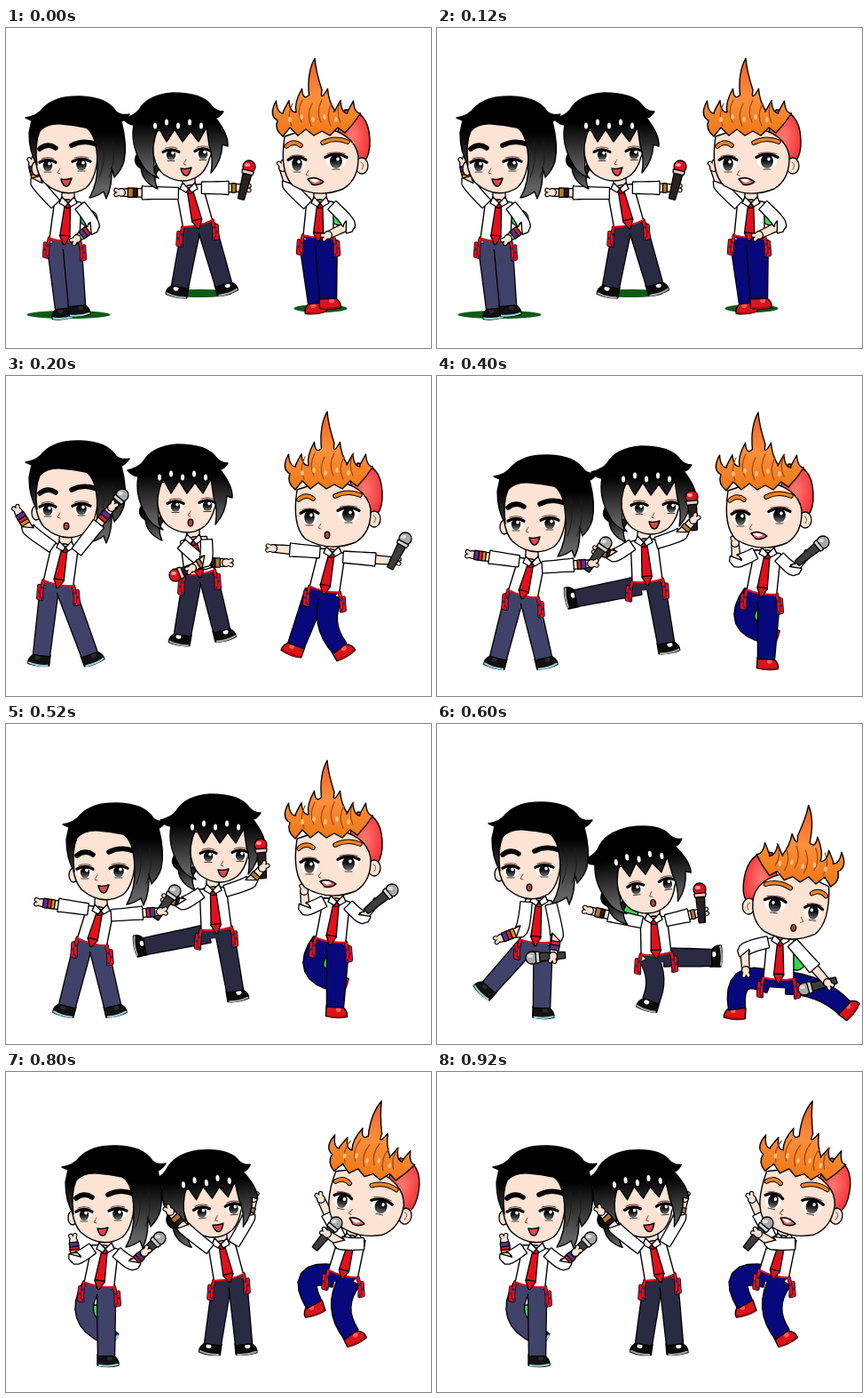
An HTML page that plays this animation: 479 by 360 pixels, repeating every 1000 ms.

```html
<!DOCTYPE html>
<html lang="en">
<head>
<meta charset="utf-8">
<title>Dancing trio</title>
<style>
html, body { margin: 0; width: 100%; height: 100%; overflow: hidden; background: #fff; }
svg { display: block; width: 100vw; height: 100vh; }
</style>
</head>
<body>
<svg viewBox="0 0 479 360" preserveAspectRatio="none">
  <defs>
    <linearGradient id="dark" x1="0" y1="0" x2="0" y2="1">
      <stop offset=".35" stop-color="#000"/><stop offset=".9" stop-color="#626262"/>
    </linearGradient>
    <linearGradient id="fire" x1="0" y1="0" x2="0" y2="1">
      <stop offset="0" stop-color="#ef5f26"/><stop offset=".5" stop-color="#fb8f3c"/><stop offset="1" stop-color="#ee7714"/>
    </linearGradient>
    <radialGradient id="shave" cx=".45" cy=".5" r=".6">
      <stop offset="0" stop-color="#ff7a70"/><stop offset="1" stop-color="#f42f35"/>
    </radialGradient>
    <linearGradient id="iris" x1="0" y1="0" x2="0" y2="1">
      <stop offset=".45" stop-color="#0c0c0c"/><stop offset="1" stop-color="#777"/>
    </linearGradient>
  </defs>
  <g id="stage" stroke-linejoin="round" stroke-linecap="round"></g>
</svg>
<script>
const SKIN = '#fde3d3', RED = '#e50f1c', INK = '#000';

const path = (d, fill = 'none', stroke = INK, width = 1.4) =>
  `<path d="${d}" fill="${fill}" stroke="${stroke}" stroke-width="${width}"/>`;
const oval = (x, y, rx, ry, fill, stroke = 'none') =>
  `<ellipse cx="${x}" cy="${y}" rx="${rx}" ry="${ry}" fill="${fill}" stroke="${stroke}" stroke-width="1.3"/>`;
const mix = (a, b, k) => a.map((v, i) => v + (b[i] - v) * k);
const add = (a, b, k = 1) => a.map((v, i) => v + b[i] * k);
const loop = (n, f) => Array.from({ length: n }, (_, i) => f(i)).join('');

// Unit vector from a to b, and the same vector turned a quarter to the right
const unit = (a, b) => {
  const d = Math.hypot(b[0] - a[0], b[1] - a[1]) || 1;
  return [(b[0] - a[0]) / d, (b[1] - a[1]) / d];
};
const turned = ([x, y]) => [-y, x];

// Tapered tube that bends softly near the joint
function limb(a, joint, b, from, to, fill) {
  const bend = mix(mix(a, b, .5), joint, 1.5), left = [], right = [];
  for (let k = 0; k <= 1; k += .125) {
    const p = mix(a, bend, k), q = mix(bend, b, k), at = mix(p, q, k);
    const n = turned(unit(p, q)), r = (from + (to - from) * k) / 2;
    left.push(add(at, n, r));
    right.unshift(add(at, n, -r));
  }
  return `<path d="M${left.concat(right).join(' ')}Z" fill="${fill}" stroke="#000" stroke-width="2.6" paint-order="stroke"/>`;
}
const tube = (a, b, from, to, fill) => limb(a, mix(a, b, .5), b, from, to, fill);

// Joint pushed sideways off the straight line from a to b
const joint = (a, [x, y, bend = 0], side) => add(mix(a, [x, y], .5), turned(unit(a, [x, y])), -side * bend);

function arm(from, goal, side, bands) {
  const elbow = joint(from, goal, side), hand = goal.slice(0, 2), u = unit(elbow, hand), n = turned(u);
  const fingers = [-2.5, 2.5].map(k => `M${hand}L${add(add(hand, u, 6), n, k)}`).join('');
  return tube(elbow, hand, 9, 7, SKIN) + path(fingers, 'none', INK, 5.4) +
    oval(...hand, 4.4, 4.4, SKIN, INK) + path(fingers, 'none', SKIN, 3.2) +
    bands.map((c, i) => tube(mix(elbow, hand, .45 + i * .15), mix(elbow, hand, .6 + i * .15), 9, 9, c)).join('') +
    limb(from, mix(elbow, mix(from, hand, .5), .15), mix(elbow, hand, .25), 12, 14, '#fff');
}

function mic(tip, hand, red) {
  const u = unit(tip, hand), along = k => add(tip, u, k);
  return tube(along(4), along(37), 9, 6, red ? '#292020' : '#3d3d3d') +
    oval(...tip, 7, 7, red ? RED : '#a9a9a9', INK) +
    tube(along(5), along(8), 12, 11, red ? '#f6c9c4' : '#d5d5d5') +
    oval(tip[0] - 2, tip[1] - 2, 3, 2, red ? '#ff9a96' : '#ddd');
}

function strap([x, y], side) {
  const d = `M${x} ${y}q${3 * side} 10 ${2 * side} 21l${4 * side} -1l${-side} -14`;
  return path(d, 'none', INK, 4.4) + path(d, 'none', RED, 3) +
    `<path d="${d}" fill="none" stroke="#24306e" stroke-width="2.6" stroke-dasharray="3 9" stroke-dashoffset="-7" stroke-linecap="butt"/>`;
}

function leg(from, goal, side, look) {
  const knee = joint(from, goal, side), foot = goal.slice(0, 2), u = unit(knee, foot);
  const [x, y] = add(foot, u, 5), turn = Math.atan2(u[1], u[0]) * 180 / Math.PI - 90;
  return `<g transform="translate(${x} ${y}) rotate(${turn}) scale(${side} 1)">` +
    path('M-10 -6Q0 -10 7 -6Q15 -1 14 6Q2 9 -10 6Z', look.shoe) +
    path('M-8 6Q3 8 13 5', 'none', look.sole, 2) + oval(4, -2, 3, 2.5, look.lace) + '</g>' +
    limb(from, knee, foot, look.thigh, 18, look.pants);
}

function mouth(x, y, kind) {
  if (kind === 'o') return oval(x, y, 2.8, 3.8, '#b4433f', INK);
  if (kind === 'grin')
    return path(`M${x - 8} ${y - 3}Q${x} ${y - 7} ${x + 10} ${y}Q${x + 4} ${y + 5} ${x - 3} ${y + 3}Z`, '#e2676a') +
      path(`M${x - 6} ${y - 2}Q${x} ${y - 5} ${x + 5} ${y - 1}L${x} ${y + 1}Z`, '#fff', 'none');
  return path(`M${x - 6} ${y - 3}Q${x} ${y - 2} ${x + 6} ${y - 4}Q${x + 3} ${y + 6} ${x} ${y + 5}Q${x - 4} ${y + 5} ${x - 6} ${y - 3}Z`, '#e0484b');
}

// Heavy flat lid over a dark iris
function eye(x, y, w, h) {
  const lid = `M${x - w} ${y - h * .4}Q${x} ${y - h * 1.2} ${x + w} ${y - h * .4}`;
  return path(lid + `Q${x + w} ${y + h} ${x} ${y + h}Q${x - w} ${y + h} ${x - w} ${y - h * .4}Z`, '#fff', 'none') +
    oval(x, y + 1, w * .58, h * .9, 'url(#iris)') + oval(x + 2, y - 1.5, 1.7, 2, '#fff') +
    path(lid, 'none', INK, 3.2) + path(`M${x - w + 2} ${y - h * .4 - 4}q${w - 2} -3 ${2 * w - 4} 0`, 'none', '#6b3a36', 1) +
    path(`M${x - 4} ${y + h + 1}h8`, 'none', '#444', 1);
}
const nose = (x, y) => path(`M${x} ${y}l-3 5l3 1`, 'none', '#76554b', 1);
const brow = (x, y, w, color) => {
  const d = `M${x - w} ${y + 3}Q${x} ${y - 4} ${x + w} ${y + 2}`;
  return path(d, 'none', INK, 5.6) + path(d, 'none', color, 3.6);
};

// Row of spikes between two heights, drawn from right to left
const zigzag = (x, step, n, low, high) => loop(n, i => `L${x - step * i} ${i % 2 ? high : low + i % 3 * 2}`);

// Flame tips: one tall tongue, shorter ones to either side
function flame() {
  const rise = i => Math.exp(-i * i / .8);
  const tongues = loop(7, k => {
    const i = k - 3, x = 348 + 14.5 * i, y = 82 - 48 * rise(i), dip = 96 - 32 * rise(i + .4);
    return `Q${x - 9} ${y + 16} ${x} ${y}Q${x + 1} ${y + 14} ${x + 8} ${dip}`;
  });
  return path(`M312 122Q302 114 306 104${tongues}Q392 108 382 118${zigzag(374, 9, 7, 112, 121)}Z`, 'url(#fire)') +
    loop(6, i => path(`M${322 + i * 11} ${110 - i % 2 * 4}q-6 -12 1 -25`, 'none', '#9b430c', 1.2)) +
    loop(5, i => oval(320 + i * 13, 103 - i % 2 * 3, 1.8, 3, '#ffc27c'));
}

const heads = {
  long: {
    pivot: [66, 150],
    draw: m => oval(34, 158, 5, 8, SKIN, INK) +
      path('M34 118Q29 158 43 174Q66 194 90 180Q104 168 104 130Q98 104 66 104Q40 104 34 118Z', SKIN) +
      eye(47, 154, 9, 7) + eye(85, 153, 10, 7) + brow(47, 133, 9, INK) + brow(88, 129, 14, INK) +
      path('M22 101Q36 99 42 90Q56 76 84 77Q114 78 124 94Q130 99 139 97Q134 104 130 105Q137 132 133 150Q130 160 122 168L119 157Q120 178 113 192L110 184Q102 190 94 191Q104 174 103 150Q102 119 90 112Q76 109 62 108Q46 107 38 116Q32 130 35 154Q26 140 26 118L29 104Z', 'url(#dark)') +
      loop(2, i => path(`M${109 + i * 11} 128q4 22 -4 40`, 'none', '#1c1c1c', 1)) +
      nose(61, 158) + mouth(68, 173, m)
  },
  tied: {
    pivot: [200, 135],
    draw: m => path('M152 136Q139 150 152 158Q154 174 171 181Q164 166 174 158Z', 'url(#dark)') +
      oval(165, 150, 5, 7, SKIN, INK) +
      path('M166 116Q162 152 178 165Q200 179 219 165Q235 150 232 110Z', SKIN) +
      eye(186, 142, 9, 6.5) + eye(222, 141, 9, 6.5) +
      path(`M132 102Q145 99 150 92Q160 75 188 73Q222 73 232 88Q237 94 245 94Q241 101 236 101Q251 120 250 133L244 131Q243 150 231 163Q234 146 229 132${zigzag(226, 9, 7, 112, 128)}Q163 132 167 150Q165 163 172 169Q158 164 152 151Q140 130 144 109Q138 109 132 102Z`, 'url(#dark)') +
      loop(5, i => oval(168 + i * 13, 110 - i % 2 * 4, 2, 3.6, '#fff')) +
      nose(203, 148) + mouth(203, 161, m)
  },
  flame: {
    pivot: [352, 155],
    draw: m => path('M382 92Q408 92 410 124Q411 142 404 150L396 152L374 116Z', 'url(#shave)') +
      oval(401, 155, 7, 9, SKIN, INK) + path('M400 151q5 2 1 8', 'none', '#8b594c', 1) +
      path('M314 122Q308 162 323 177Q350 193 380 181Q398 170 397 144Q393 117 350 110Z', SKIN) +
      eye(328, 152, 10, 9) + eye(372, 149, 12, 9) +
      brow(324, 130, 8, '#f08125') + brow(371, 126, 14, '#f08125') + flame() +
      nose(341, 160) + mouth(348, 173, m)
  }
};

const looks = {
  long: { pants: '#41426a', thigh: 20, shoe: '#111', sole: '#9fd7dc', lace: '#2b2b2b', bands: ['#e88b25', '#d8222b', '#5b2f92'] },
  tied: { pants: '#2a2b42', thigh: 20, shoe: '#0b0b0b', sole: '#aaa', lace: '#fff', bands: ['#2b1713', '#b5762c'] },
  flame: { pants: '#07087c', thigh: 24, shoe: '#dc1418', sole: '#9c0b10', lace: '#f0605c', bands: [] }
};

/* head: shift and turn   hands, feet: left and right goals with an optional bend
   over: which arms (0 left, 1 right) lie over the head   mic: its tip, held in the right hand */
function dancer(kind, o) {
  const look = looks[kind], head = heads[kind], [cx, cy] = head.pivot;
  const [dx, dy, turn = 0] = o.head, { neck, hip, over = '' } = o;
  const down = unit(neck, hip), across = turned(down).map(v => -v);
  const wide = (p, half) => [-1, 1].map(side => add(p, across, side * half));
  const [s1, s2] = wide(add(neck, down, 2), 15), [w1, w2] = wide(hip, 17);
  const starts = wide(add(hip, down, 5), 9), arms = wide(add(neck, down, 6), 14);
  const [nx, ny] = neck, knot = add(neck, down, 6), tip = add(hip, down, 5), flare = mix(knot, tip, .8);
  const side = i => i ? 1 : -1;
  const draw = i => arm(arms[i], o.hands[i], side(i), look.bands.slice(i && 1));
  const pick = front => [0, 1].filter(i => over.includes(i) === front).map(draw).join('');
  const ground = mix(o.feet[0].slice(0, 2), o.feet[1].slice(0, 2), .5);

  return (o.shade ? oval(ground[0] - 2, ground[1] + 9, o.shade, 4.5, '#0c5b17') : '') +
    (o.gap ? oval(...o.gap, 10, 9, '#38d653', INK) : '') +
    starts.map((p, i) => leg(p, o.feet[i], side(i), look)).join('') +
    path(`M${[w1, w2, add(starts[1], down, 6), add(starts[0], down, 6)]}Z`, look.pants, 'none') +
    strap(w1, -1) + strap(w2, 1) +
    tube([nx, ny - 12], [nx, ny + 4], 12, 14, SKIN) +
    path(`M${s1}L${neck}L${s2}Q${mix(s2, w2, .5)} ${w2}Q${add(hip, down, 4)} ${w1}Q${mix(s1, w1, .5)} ${s1}Z`, '#fff') +
    path(`M${w1}Q${add(hip, down, 4)} ${w2}`, 'none', RED, 2) +
    tube(knot, flare, 5, 10, RED) + tube(flare, tip, 10, 1, RED) + oval(...knot, 4, 3.5, RED, INK) +
    [-1, 1].map(s => path(`M${nx + 7 * s} ${ny - 3}l${3 * s} 7l${-7 * s} 4l${-3 * s} -4Z`, '#fff')).join('') +
    pick(false) +
    `<g transform="translate(${dx} ${dy}) rotate(${turn} ${cx} ${cy}) ${o.flip ? `translate(${2 * cx} 0) scale(-1 1)` : ''}">${head.draw(o.mouth)}</g>` +
    (o.mic ? mic(o.mic, o.hands[1], kind === 'tied') : '') + pick(true);
}

const scenes = [
  () => dancer('tied', { head: [0, 0], mouth: 'smile', neck: [206, 177], hip: [216, 220], hands: [[130, 185], [268, 180]],
      feet: [[196, 291], [245, 288]], mic: [274, 156], shade: 36 }) +
    dancer('long', { head: [0, 0], mouth: 'smile', neck: [70, 193], hip: [66, 238], hands: [[30, 153, -7], [80, 237, 20]],
      feet: [[65, 315], [80, 312]], shade: 47, gap: [93, 214] }) +
    dancer('flame', { head: [0, 0], mouth: 'grin', neck: [354, 193], hip: [352, 234], hands: [[312, 157, -6], [363, 233, 26]],
      feet: [[350, 309], [363, 304]], shade: 30, gap: [376, 213] }),

  () => dancer('tied', { head: [5, 4], mouth: 'o', neck: [211, 181], hip: [218, 221], hands: [[248, 210, 11], [210, 216, 11]],
      feet: [[199, 291], [243, 286]], mic: [191, 224], over: '10' }) +
    dancer('long', { head: [0, -4], mouth: 'o', neck: [67, 189], hip: [59, 233], hands: [[14, 153, -6], [119, 148]],
      feet: [[40, 314], [94, 313]], mic: [131, 134], over: '1' }) +
    dancer('flame', { head: [14, 6], mouth: 'o', neck: [368, 195], hip: [359, 240], hands: [[301, 194], [437, 208]],
      feet: [[327, 303], [376, 306, -12]], mic: [450, 183] }),

  () => dancer('tied', { head: [42, 6], mouth: 'smile', neck: [233, 183], hip: [237, 230], hands: [[183, 197, -9], [289, 162, -7]],
      feet: [[157, 250], [258, 300]], mic: [287, 136], over: '1' }) +
    dancer('long', { head: [42, 12], mouth: 'smile', neck: [107, 206], hip: [97, 245], hands: [[40, 201], [174, 211]],
      feet: [[69, 317], [120, 317]], mic: [190, 188], over: '1' }) +
    dancer('flame', { head: [14, 7], mouth: 'grin', neck: [373, 196], hip: [366, 243], hands: [[336, 188, -20], [414, 204, -16]],
      feet: [[372, 291, 24], [371, 318]], mic: [435, 187], gap: [362, 268] }),

  () => dancer('tied', { head: [37, 41, -8], mouth: 'o', neck: [244, 216], hip: [247, 258], hands: [[172, 210], [298, 212]],
      feet: [[241, 311, -8], [309, 263]], mic: [296, 186], gap: [217, 211] }) +
    dancer('long', { head: [36, 11], mouth: 'o', neck: [115, 196], hip: [111, 244], hands: [[72, 241, -16], [131, 261, 6]],
      feet: [[59, 296], [118, 319]], mic: [107, 263], over: '1' }) +
    dancer('flame', { head: [48, 56, 7], flip: true, mouth: 'o', neck: [387, 240], hip: [385, 286], hands: [[348, 277, 18], [440, 291]],
      feet: [[338, 320, 27], [459, 319, 9]], mic: [414, 298], gap: [405, 268], over: '1' }),

  () => dancer('tied', { head: [34, 14, -5], mouth: 'smile', neck: [242, 190], hip: [251, 231], hands: [[185, 157, -3], [279, 142, -4]],
      feet: [[233, 306], [268, 306]], over: '0' }) +
    dancer('long', { head: [41, 6], mouth: 'smile', neck: [112, 195], hip: [105, 239], hands: [[76, 190, -20], [156, 203, -15]],
      feet: [[112, 296, 20], [113, 319]], mic: [173, 187], gap: [101, 271], over: '1' }) +
    dancer('flame', { head: [50, -3, 12], mouth: 'grin', neck: [391, 184], hip: [380, 227], hands: [[355, 143], [362, 182, 7]],
      feet: [[347, 261, 28], [389, 295, -14]], mic: [372, 170], over: '1' })
];

const stage = document.getElementById('stage');
let shown = -1;
function update(ms) {
  const step = Math.floor(ms % 1000 / 200);
  if (step !== shown) stage.innerHTML = scenes[shown = step]();
}
function tick() {
  update(performance.now());
  requestAnimationFrame(tick);
}
tick();
</script>
</body>
</html>
```
